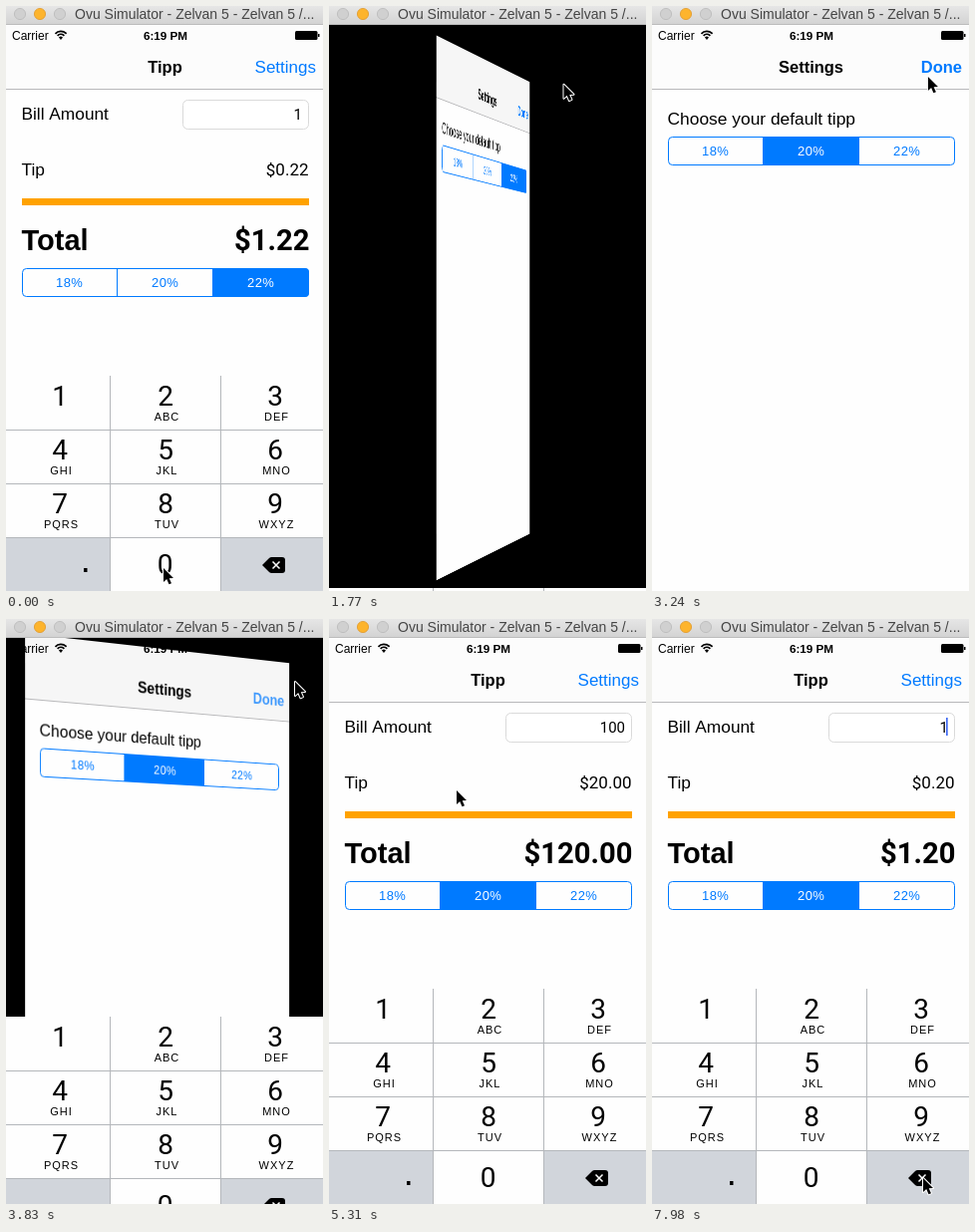
Recreate the animation shown at these times as an HTML page with a canvas. Size 318x587 px, loop 8 s.

```html
<!DOCTYPE html>
<html lang="en">
<head>
<meta charset="utf-8">
<title>Tip calculator</title>
<style>
html, body { margin: 0; width: 100%; height: 100%; overflow: hidden; background: #000; }
#stage { position: relative; width: 318px; height: 587px; overflow: hidden; background: #000; }
canvas { position: absolute; left: 0; display: block; }
#page { top: 19px; transform-origin: 50% 50%; }
#over { top: 0; }
</style>
</head>
<body>
<div id="stage">
  <canvas id="page" width="318" height="568"></canvas>
  <canvas id="over" width="318" height="587"></canvas>
</div>
<script>
const W = 318, H = 587, LOOP = 8000, STEP = 147.8;
const FLIP = 675, OPEN = 1389, CLOSE = 3662, KEYS_Y = 371;
const BLUE = '#007aff';
const FONT = '"Liberation Sans", Arial, sans-serif';
const DIGITS = 'Roboto, "Liberation Sans", sans-serif';
const page = document.getElementById('page');
const pg = page.getContext('2d');
const ov = document.getElementById('over').getContext('2d');

// pointer stops: step, x, y
const stops = [
  [0, 158, 564], [4, 158, 564], [8, 263, 56], [10, 263, 56], [16, 153, 147],
  [18, 153, 147], [23, 290, 63], [26, 290, 63], [29, 230, 144], [32, 190, 160],
  [33, 160, 186], [34, 143, 189], [35, 131, 178], [36, 128, 172], [37, 128, 172],
  [44, 256, 134], [46, 256, 134], [50, 272, 561], [60, 272, 561]
];

const clamp = v => Math.max(0, Math.min(1, v));
const swing = v => (1 - Math.cos(Math.PI * clamp(v))) / 2;

function text(c, s, x, y, size, o = {}) {
  c.font = (o.bold ? 'bold ' : '') + size + 'px ' + (o.font || FONT);
  c.fillStyle = o.color || '#000';
  c.textAlign = o.align || 'left';
  c.letterSpacing = (o.gap || 0) + 'px';
  c.fillText(s, x, y);
  c.letterSpacing = '0px';
}

function rect(c, x, y, w, h, color) {
  c.fillStyle = color;
  c.fillRect(x, y, w, h);
}

function rounded(c, x, y, w, h, r) {
  c.beginPath();
  c.roundRect(x, y, w, h, r);
}

function segments(y, chosen) {
  pg.save();
  rounded(pg, 16, y, 288, 29, 4);
  pg.clip();
  rect(pg, 16 + chosen * 96, y, 96, 29, BLUE);
  rect(pg, 111, y, 1, 29, BLUE);
  rect(pg, 207, y, 1, 29, BLUE);
  pg.restore();
  rounded(pg, 16.5, y + .5, 287, 28, 4);
  pg.strokeStyle = BLUE;
  pg.lineWidth = 1;
  pg.stroke();
  ['18%', '20%', '22%'].forEach((s, i) =>
    text(pg, s, 63.7 + i * 96, y + 19, 13, { align: 'center', gap: .4, color: i === chosen ? '#fff' : BLUE }));
}

function navBar(title, button, bold, alpha, turning) {
  rect(pg, 0, 19, W, 568, '#fefefe');
  rect(pg, 0, 19, W, 64, turning ? '#f6f6f6' : '#fcfcfc');
  rect(pg, 0, 83, W, 1, '#b8b8ba');
  text(pg, title, 159.5, 67, 16.5, { align: 'center', bold: true });
  pg.globalAlpha = alpha;
  text(pg, button, 311, 67, bold ? 16.5 : 17, { align: 'right', bold, color: BLUE });
  pg.globalAlpha = 1;
}

function mainPage(s) {
  const tip = s.amount * [.18, .2, .22][s.chosen];
  const money = v => '$' + v.toFixed(2);
  const right = { align: 'right', font: DIGITS };
  navBar('Tipp', 'Settings', false, s.settingsAlpha, s.turning);
  text(pg, 'Bill Amount', 15.5, 114, 17.3);
  rounded(pg, 177.5, 94.5, 126, 29, 5);
  pg.fillStyle = '#fff';
  pg.fill();
  pg.strokeStyle = '#dadada';
  pg.lineWidth = 1;
  pg.stroke();
  text(pg, String(s.amount), 297, 114, 15, right);
  if (s.caret) rect(pg, 295, 99, 1.7, 18, '#426bf2');
  text(pg, 'Tip', 15.5, 170, 17.3);
  text(pg, money(tip), 303.5, 170, 17, right);
  rect(pg, 16, 193, 288, 7, '#ffa200');
  text(pg, 'Total', 15.5, 245, 29, { bold: true });
  text(pg, money(s.amount + tip), 304.5, 245, 29.2, { ...right, bold: true });
  segments(263, s.chosen);
}

function settingsPage(s) {
  navBar('Settings', 'Done', true, s.doneAlpha, s.turning);
  text(pg, 'Choose your default tipp', 15.5, 119, 17.4);
  segments(131, s.chosen);
}

function titleBar() {
  const g = ov.createLinearGradient(0, 0, 0, 19);
  g.addColorStop(0, '#e6e6e6');
  g.addColorStop(1, '#d2d2d2');
  rect(ov, 0, 0, W, 19, g);
  rect(ov, 0, 18, W, 1, '#bcbcbc');
  ['#d0d0d0', '#fdb42d', '#d0d0d0'].forEach((color, i) => {
    ov.beginPath();
    ov.arc(14 + i * 20, 8, 5.6, 0, 7);
    ov.fillStyle = color;
    ov.fill();
    ov.strokeStyle = i === 1 ? '#e0982a' : '#b9b9b9';
    ov.lineWidth = .8;
    ov.stroke();
  });
  text(ov, 'Ovu Simulator - Zelvan 5 - Zelvan 5 /...', 69, 13, 14, { color: '#454545' });
}

function statusBar() {
  text(ov, 'Carrier', 6, 34, 12);
  text(ov, '6:19 PM', 160, 34, 11.7, { align: 'center', bold: true });
  ov.strokeStyle = ov.fillStyle = '#000';
  ov.lineWidth = 1.7;
  for (const r of [4.6, 7.6]) {
    ov.beginPath();
    ov.arc(55, 33, r, -Math.PI * .76, -Math.PI * .24);
    ov.stroke();
  }
  ov.beginPath();
  ov.moveTo(55, 34);
  ov.arc(55, 33.5, 2.8, -Math.PI * .76, -Math.PI * .24);
  ov.fill();
  rounded(ov, 290, 25, 22.5, 9, 1.5);
  ov.fill();
  rect(ov, 313, 28, 1.5, 3, '#000');
}

function backspace(x, y) {
  ov.beginPath();
  ov.moveTo(x, y + 8);
  ov.lineTo(x + 7, y + 1);
  ov.quadraticCurveTo(x + 8, y, x + 9.5, y);
  ov.lineTo(x + 20, y);
  ov.quadraticCurveTo(x + 23, y, x + 23, y + 3);
  ov.lineTo(x + 23, y + 13);
  ov.quadraticCurveTo(x + 23, y + 16, x + 20, y + 16);
  ov.lineTo(x + 9.5, y + 16);
  ov.quadraticCurveTo(x + 8, y + 16, x + 7, y + 15);
  ov.closePath();
  ov.fillStyle = '#000';
  ov.fill();
  ov.beginPath();
  for (const d of [-1, 1]) {
    ov.moveTo(x + 10.5, y + 8 - 3.5 * d);
    ov.lineTo(x + 17.5, y + 8 + 3.5 * d);
  }
  ov.strokeStyle = '#fff';
  ov.lineWidth = 1.5;
  ov.stroke();
}

function keyboard(y, pressed) {
  if (y >= H) return;
  const gray = '#d1d5db', line = '#b4b7bb';
  const mid = [54, 160, 270];
  const names = ['', 'ABC', 'DEF', 'GHI', 'JKL', 'MNO', 'PQRS', 'TUV', 'WXYZ'];
  const digit = { align: 'center', font: DIGITS };
  ov.save();
  ov.translate(0, y);
  rect(ov, 0, 0, W, 216, '#fefefe');
  rect(ov, 0, 162, 105, 54, gray);
  rect(ov, 215, 162, 103, 54, pressed === 'del' ? '#fefefe' : gray);
  if (pressed === '0') rect(ov, 105, 162, 110, 54, gray);
  for (const x of [104, 215]) rect(ov, x, 0, 1, 216, line);
  for (const r of [54, 108, 162]) rect(ov, 0, r, W, 1, line);
  names.forEach((s, i) => {
    const x = mid[i % 3], top = Math.floor(i / 3) * 54;
    text(ov, String(i + 1), x, top + 30, 28, digit);
    text(ov, s, x + 1.5, top + 45, 11, { align: 'center', gap: 1 });
  });
  text(ov, '0', 159.5, 199, 28, digit);
  rect(ov, 78, 193, 3.5, 4, '#000');
  backspace(257, 182);
  ov.restore();
}

function pointer(step) {
  let i = 0;
  while (stops[i + 1][0] <= step) i++;
  const [a, ax, ay] = stops[i], [b, bx, by] = stops[i + 1];
  const p = swing((step - a) / (b - a));
  ov.save();
  ov.translate(ax + (bx - ax) * p, ay + (by - ay) * p);
  ov.beginPath();
  [[0, 0], [0, 14], [3.2, 11], [5.5, 16.3], [8, 15.2], [5.7, 10.2], [10, 10]].forEach(q => ov.lineTo(...q));
  ov.closePath();
  ov.lineJoin = 'round';
  ov.lineWidth = 2;
  ov.strokeStyle = '#fff';
  ov.stroke();
  ov.fillStyle = '#000';
  ov.fill();
  ov.restore();
}

function draw(now) {
  const step = Math.floor((now % LOOP + 20) / STEP), t = step * STEP;

  const closing = t >= CLOSE;
  const since = t - (closing ? CLOSE : OPEN);
  const p = swing(since / FLIP);
  const settings = closing ? p < .5 : p >= .5;
  const angle = (closing ? 1 : -1) * 180 * (p < .5 ? p : p - 1);
  const slide = 1 - Math.exp(-.01125 * Math.max(0, since));
  const keysY = KEYS_Y + 216 * (closing ? 1 - slide : slide);

  let amount = 100;
  if (step < 2 || step >= 54) amount = 1;
  else if (step < 4 || step >= 52) amount = 10;
  const s = {
    amount,
    chosen: step < 18 ? 2 : 1,
    caret: step % 7 >= 3,
    turning: p > 0 && p < .98,
    settingsAlpha: step === 9 || step === 10 ? .45 : 1,
    doneAlpha: step === 25 ? .3 : step === 26 ? .75 : 1
  };

  pg.setTransform(1, 0, 0, 1, 0, -19);
  pg.clearRect(0, 0, W, H);
  (settings ? settingsPage : mainPage)(s);
  const back = 230 * Math.sin(angle * Math.PI / 180) ** 2;
  page.style.transform = Math.abs(angle) < .01 ? 'none'
    : `perspective(1400px) translateZ(${-back}px) rotateY(${angle}deg)`;

  ov.clearRect(0, 0, W, H);
  titleBar();
  statusBar();
  const pressed = step === 1 || step === 3 ? '0' : step === 51 || step === 53 ? 'del' : '';
  keyboard(keysY > H - 1 ? H : Math.round(keysY), pressed);
  pointer(step);
}

const start = performance.now();
function tick() {
  draw(performance.now() - start);
  requestAnimationFrame(tick);
}
tick();
</script>
</body>
</html>
```
